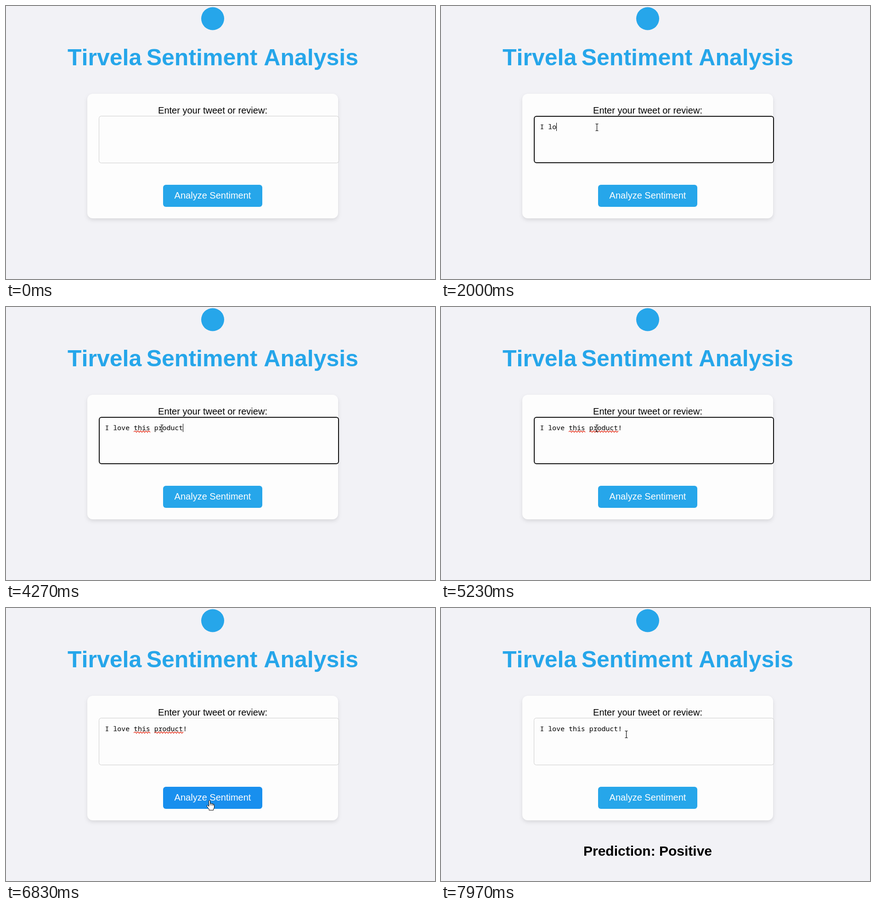
Animation, 934 px wide and 594 px high, one loop 8 s. Source, as an HTML page:

```html
<!DOCTYPE html>
<html lang="en">
<head>
<meta charset="utf-8">
<title>Sentiment Analysis</title>
<style>
html, body { margin: 0; width: 100%; height: 100%; overflow: hidden; background: #f2f2f6; }
svg { display: block; width: 100vw; height: 100vh; }
text { font-family: "Liberation Sans", Arial, sans-serif; white-space: pre; }
.title { font-size: 50px; font-weight: bold; font-kerning: none; fill: #26a6ea; }
.mid { text-anchor: middle; font-size: 20px; }
#typed { font: 14.9px "Noto Sans Mono", "DejaVu Sans Mono", monospace; }
.wave { fill: none; stroke: #e2301c; stroke-width: 1.3; }
</style>
</head>
<body>
<svg viewBox="0 0 934 594" preserveAspectRatio="none">
  <defs>
    <filter id="shadow" x="-10%" y="-10%" width="120%" height="125%" color-interpolation-filters="sRGB">
      <feDropShadow dx="0" dy="4" stdDeviation="4" flood-color="#000" flood-opacity=".1"/>
    </filter>
  </defs>
  <rect width="934" height="594" fill="#f2f2f6"/>
  <circle cx="450" cy="27.5" r="25" fill="#26a6ea"/>
  <text class="title" x="134" y="129">Tirvela</text>
  <text class="title" x="305.7" y="129">Sentiment Analysis</text>

  <rect x="177" y="191" width="546" height="271" rx="12" fill="#fdfdfd" filter="url(#shadow)"/>
  <text class="mid" x="450" y="234">Enter your tweet or review:</text>
  <rect id="field" fill="#fdfdfd"/>
  <text id="typed" x="215.5" y="268"></text>
  <path id="wave1" class="wave"/>
  <path id="wave2" class="wave"/>
  <rect id="caret" y="254" width="1" height="18"/>

  <rect id="button" x="342" y="389" width="216" height="48" rx="6"/>
  <text class="mid" x="450" y="419" fill="#fff">Analyze Sentiment</text>
  <text id="result" class="mid" x="450" y="539" style="font-size:30px;font-weight:bold">Prediction: Positive</text>

  <g id="pointer">
    <path id="arrow" d="M0 0V16.5L3.8 13L6.4 19L9 17.9L6.4 12H11.8Z" fill="#fff" stroke="#000"/>
    <path id="beam" d="M-3 -7.5H-1L0 -6.5L1 -7.5H3M0 -6.5V6.5M-3 7.5H-1L0 6.5L1 7.5H3" fill="none" stroke="#000" stroke-width="1.1"/>
    <g id="hand" stroke="#000" stroke-linejoin="round" stroke-linecap="round">
      <path d="M-1.5 0.5Q0 -1.5 1.5 0.5V6.5Q3.5 5 5 7Q7 6 8 8Q10.5 7.5 10.5 10V14Q10.5 16.5 8.5 18.5V21H-1V18.5Q-3 16.5 -5.5 12.5Q-6.5 10.5 -4.5 10Q-3.5 10 -1.5 12.5Z" fill="#fff"/>
      <path d="M1.5 6.5V10M5 7.5V10.5M8 8.5V11" fill="none"/>
    </g>
  </g>
</svg>
<script>
const LOOP = 8000, MESSAGE = "I love this product!";
const ORIGIN = 215.5, ADVANCE = 8.94;
const FOCUS = 600, BANG = 4600, CLICK = 6560, RELOAD = 7100;
const HOVER_IN = 6120, HOVER_OUT = 7440, FADE = 300;
const MOUSE = [
  [30, 20, -24], [520, 339.5, 264], [5700, 339.5, 264],
  [6140, 413, 410], [6500, 443, 419], [7300, 443, 419], [7800, 403.5, 275]
];
const $ = id => document.getElementById(id);
const clamp = v => Math.min(1, Math.max(0, v));
const ease = v => v * v * (3 - 2 * v);
const show = (id, on) => $(id).setAttribute("visibility", on ? "visible" : "hidden");
const set = (id, attrs) => {
  for (const key in attrs) $(id).setAttribute(key, attrs[key]);
};

// Times at which each character appears
const keys = [...MESSAGE].map((c, i) => c === "!" ? BANG : 1340 + (i + 1) * 145);

function wavePath(from, to) {
  let d = `M${from} 271.5`;
  for (let x = from, up = true; x < to; x += 3, up = !up)
    d += `L${Math.min(x + 3, to)} ${up ? 269.5 : 272.5}`;
  return d;
}

function mouseAt(t) {
  const next = MOUSE.findIndex(m => m[0] > t);
  if (next < 0) return MOUSE.at(-1).slice(1);
  if (next === 0) return MOUSE[0].slice(1);
  const a = MOUSE[next - 1], b = MOUSE[next];
  const k = ease((t - a[0]) / (b[0] - a[0]));
  return [1, 2].map(i => a[i] + (b[i] - a[i]) * k);
}

function inside(x, y, left, top, right, bottom) {
  return x >= left && x <= right && y >= top && y <= bottom;
}

function drawField(t) {
  const focused = t >= FOCUS && t < CLICK;
  const line = focused ? 2 : 1;
  set("field", {
    x: 202 + line / 2, y: 239 + line / 2, width: 523 - line, height: 103 - line,
    rx: 5, stroke: focused ? "#101010" : "#ccc", "stroke-width": line
  });
  const count = keys.filter(k => k <= t).length;
  $("typed").textContent = MESSAGE.slice(0, count);
  const lastInput = count ? keys[count - 1] : FOCUS;
  show("caret", focused && (t - lastInput) % 1000 < 500);
  set("caret", { x: Math.round(ORIGIN + count * ADVANCE - 0.5) });
  show("wave1", t >= keys[11] && t < RELOAD);
  show("wave2", t >= BANG && t < RELOAD);
}

function drawButton(t) {
  const k = clamp((t - HOVER_IN) / FADE) - clamp((t - HOVER_OUT) / FADE);
  const from = [38, 166, 234], to = [24, 143, 238];
  set("button", { fill: `rgb(${from.map((c, i) => Math.round(c + (to[i] - c) * k))})` });
}

function drawPointer(t) {
  const [x, y] = mouseAt(t);
  const beam = inside(x, y, 202, 239, 725, 342);
  const hand = inside(x, y, 342, 389, 558, 437);
  const on = t >= 30;
  show("beam", on && beam);
  show("hand", on && hand);
  show("arrow", on && !beam && !hand);
  set("pointer", { transform: `translate(${x} ${y})` });
}

function frame(now) {
  const t = now % LOOP;
  drawField(t);
  drawButton(t);
  drawPointer(t);
  show("result", t >= RELOAD);
  requestAnimationFrame(frame);
}

set("wave1", { d: wavePath(278, 314) });
set("wave2", { d: wavePath(323, 386) });
frame(0);
</script>
</body>
</html>
```
